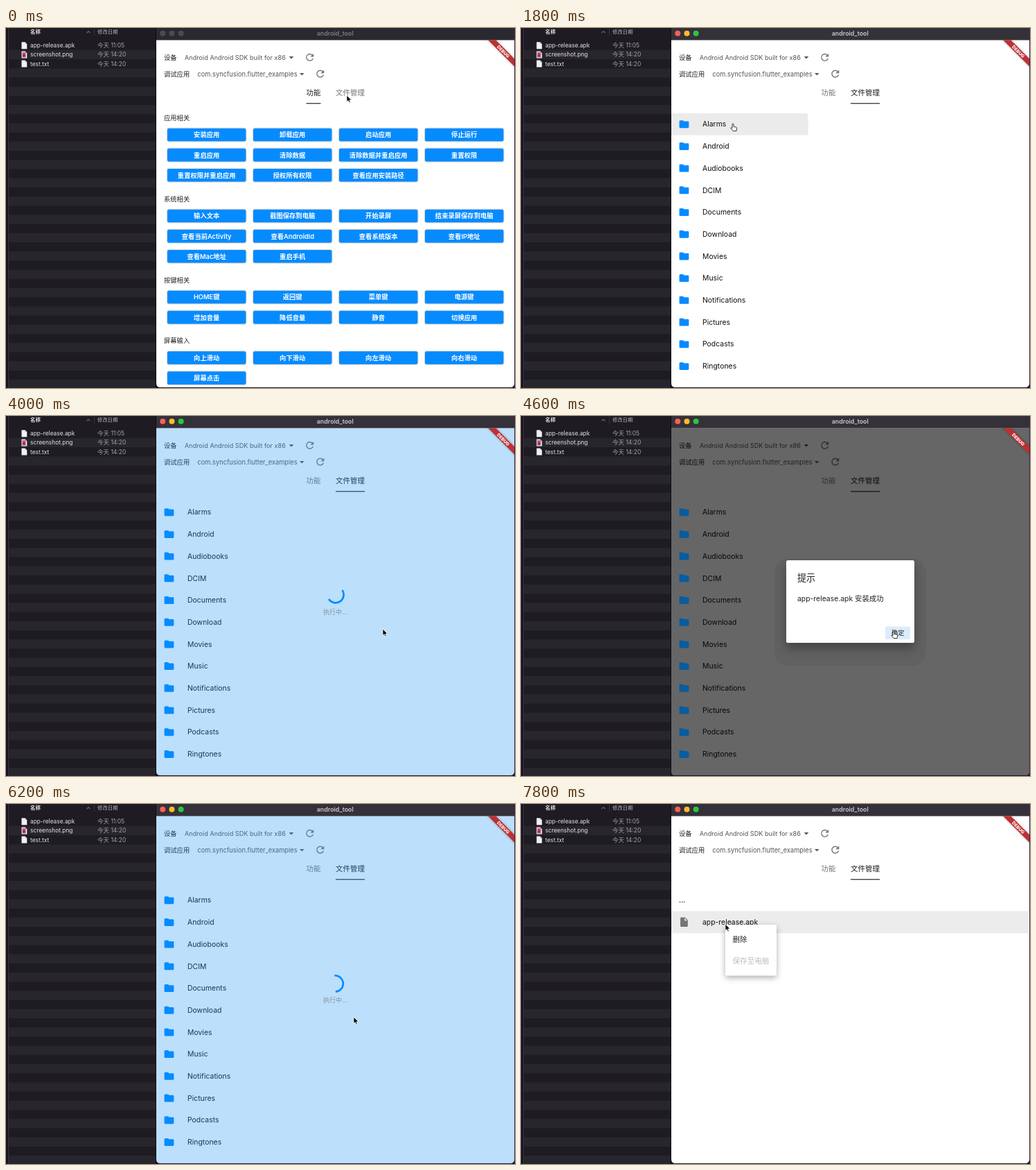
Recreate the animation shown at these times as an HTML page. Size 735 by 519 pixels, loop 8 s.

```html
<!DOCTYPE html>
<html lang="zh-CN">
<head>
<meta charset="utf-8">
<title>android_tool</title>
<style>
html, body { margin: 0; width: 100%; height: 100%; overflow: hidden; background: #17131f; }
svg { display: block; width: 735px; height: 519px; }
text { font-family: Inter, "Noto Sans CJK SC", "Noto Sans CJK JP", sans-serif; white-space: pre; }
.raised { filter: drop-shadow(0 .8px .8px rgba(0,0,0,.38)); }
.dialog { filter: drop-shadow(0 8px 7px rgba(0,0,0,.3)); }
.menu { filter: drop-shadow(0 3px 4px rgba(0,0,0,.32)); }
</style>
</head>
<body>
<svg id="stage" viewBox="0 0 735 519" xmlns="http://www.w3.org/2000/svg">
  <defs>
    <clipPath id="body"><path d="M217 17.5H734V512Q734 518 728 518H223Q217 518 217 512Z"/></clipPath>
    <clipPath id="row"><rect x="217" y="123" width="517" height="31.5"/></clipPath>
    <linearGradient id="edge">
      <stop offset="0" stop-opacity=".24"/><stop offset=".4" stop-opacity=".1"/><stop offset="1" stop-opacity=".035"/>
    </linearGradient>
  </defs>
  <g id="finder"></g>
  <g id="app"></g>
</svg>
<script>
const LOOP = 8000, STEP = 200, BLUE = '#068bff';
const FOLDER = 'M10 4H4c-1.1 0-2 .9-2 2v12c0 1.1.9 2 2 2h16c1.1 0 2-.9 2-2V8c0-1.1-.9-2-2-2h-8z';
const FILE = 'M6 2c-1.1 0-2 .9-2 2v16c0 1.1.9 2 2 2h12c1.1 0 2-.9 2-2V8l-6-6zm7 7V3.5L18.5 9z';
const REFRESH = 'M17.65 6.35A8 8 0 1 0 19.73 14h-2.08A6 6 0 1 1 16.22 7.78L13 11h7V4z';
const ARROW = 'M0 0V9.6L2.2 7.6 3.7 11 5.3 10.3 3.9 7H6.9Z';
const HAND = 'M-1 .8C-1-.4 1-.4 1 .8V4.2L4.6 5C5.6 5.3 5.8 6 5.6 7L5 10.5H.2L-3 6.8C-3.6 5.8-2.4 5.2-1.7 5.9L-1 6.6Z';

const FOLDERS = ['Alarms', 'Android', 'Audiobooks', 'DCIM', 'Documents', 'Download',
  'Movies', 'Music', 'Notifications', 'Pictures', 'Podcasts', 'Ringtones'];
const SECTIONS = [
  [129.5, '应用相关', '安装应用 卸载应用 启动应用 停止运行 重启应用 清除数据 清除数据并重启应用 重置权限 重置权限并重启应用 授权所有权限 查看应用安装路径'],
  [246.5, '系统相关', '输入文本 截图保存到电脑 开始录屏 结束录屏保存到电脑 查看当前Activity 查看AndroidId 查看系统版本 查看IP地址 查看Mac地址 重启手机'],
  [363.5, '按键相关', 'HOME键 返回键 菜单键 电源键 增加音量 降低音量 静音 切换应用'],
  [451, '屏幕输入', '向上滑动 向下滑动 向左滑动 向右滑动 屏幕点击']
];
const ASK = { y: 214, h: 107, msg: '是否安装app-release.apk?', cancel: true };
const done = msg => ({ y: 208, h: 119, msg: 'app-release.apk ' + msg });
const DIALOGS = [
  [3400, 3800, ASK], [4400, 5000, done('安装成功')],
  [5500, 6200, ASK], [6400, 7000, done('传输成功')]
];

// pointer path: time, x, y
const PATH = [[0, 492, 97], [800, 492, 97], [1400, 306, 138], [2200, 306, 138], [2600, 67, 25],
  [3000, 308, 99], [3200, 322, 160], [3300, 322, 160], [3600, 544, 307], [4300, 544, 307],
  [4600, 538, 310], [4800, 538, 310], [5100, 67, 25], [5400, 320, 309], [5600, 320, 309],
  [6000, 502, 307], [6200, 502, 307], [6400, 538, 310], [6800, 538, 310], [7200, 306, 138],
  [7400, 306, 138], [7600, 295, 173], [8000, 295, 173]];
// half-open time spans
const BACK = [[0, 200], [2600, 3600], [5100, 6000]];
const DRAG = [[2700, 3300], [5150, 5500]];
const POINTING = [[200, 800], [1400, 2400], [3600, 3800], [4600, 5000], [6000, 6200], [6400, 7000], [7200, 7600]];
const LOADING = [[3800, 4400], [6200, 6400]];
const INSIDE = [[2000, 2400], [7400, 8000]];

const clamp = v => Math.max(0, Math.min(1, v));
const lerp = (a, b, p) => a + (b - a) * p;
const ease = p => p * p * (3 - 2 * p);
const within = (t, spans) => spans.some(([a, b]) => t >= a && t < b);

const rect = (x, y, w, h, fill, more = '') =>
  `<rect x="${x}" y="${y}" width="${w}" height="${h}" fill="${fill}" ${more}/>`;
const text = (x, y, s, size, fill, more = '') =>
  `<text x="${x}" y="${y + size * .36}" font-size="${size}" fill="${fill}" ${more}>${s}</text>`;
const path = (d, fill, more = '') => `<path d="${d}" fill="${fill}" ${more}/>`;
const icon = (d, x, y, scale, fill) =>
  path(d, fill, `transform="translate(${x} ${y}) scale(${scale}) translate(-12 -12)"`);
const group = (s, more) => `<g ${more}>${s}</g>`;
const MID = 'text-anchor="middle"', BOLD = 'font-weight="600"', MEDIUM = 'font-weight="500"';

function finder() {
  let s = rect(0, 0, 735, 519, '#1a1328') + rect(3.5, 0, 213, 519, '#1e1c22');
  for (let i = 1; i < 38; i += 2) s += rect(4, 18.6 + 13.2 * i, 212, 13.2, '#28262d');
  s += rect(3, 0, 1, 519, '#37343c') + rect(216, 0, 1, 519, '#0e0c12') + rect(127, 1, .7, 10, '#403e45');
  s += text(35, 5.5, '名称', 7.4, '#e4e2e6', BOLD) + text(132, 5.5, '修改日期', 7.4, '#b5b3b8');
  s += path('M116.5 7.2 119 4.6 121.5 7.2', 'none', 'stroke="#a5a3a9" stroke-width=".9"');
  [['app-release.apk', '11:05'], ['screenshot.png', '14:20'], ['test.txt', '14:20']].forEach(([name, time], i) => {
    const y = 25.3 + 13.1 * i;
    s += path(`M22.5 ${y - 5}h5l2.8 2.8v7.2h-7.8z`, '#f1f0f2') + path(`M27.5 ${y - 5}v2.8h2.8z`, '#bbb9be');
    if (i === 1) s += rect(23.5, y - 3.5, 5.2, 7.5, '#cf5b79') + rect(24.5, y - .5, 3, 3.5, '#7b3158');
    s += text(35, y, name, 8.35, '#e6e4e8') + text(132, y, '今天 ' + time, 8.5, '#a4a2a8');
  });
  return s;
}

function titleBar(active) {
  const lights = active ? ['#ff5f57', '#febc2e', '#28c840'] : ['#4c4a51', '#4c4a51', '#4c4a51'];
  return rect(217, 0, 517, 18, active ? '#353139' : '#2b2930') +
    lights.map((c, i) => `<circle cx="${226.3 + 13.2 * i}" cy="7.8" r="4" fill="${c}"/>`).join('') +
    text(475.3, 7.6, 'android_tool', 8.9, active ? '#c9c7cc' : '#7d7b82', MID + ' ' + BOLD);
}

function header(tab) {
  const caret = (x, y) => path(`M${x - 3.3} ${y - 1.6}h6.6l-3.3 3.3z`, '#555');
  const shade = p => { const v = Math.round(lerp(117, 30, p)); return `rgb(${v},${v},${v})`; };
  return text(228, 42.7, '设备', 9.3, '#222', MEDIUM) +
    text(258, 43, 'Android Android SDK built for x86', 9.15, '#555') + caret(412, 42.7) +
    icon(REFRESH, 438.7, 42.3, .69, '#757575') +
    text(228, 66.3, '调试应用', 9.3, '#222', MEDIUM) +
    text(276.5, 66.7, 'com.syncfusion.flutter_examples', 9.25, '#555') + caret(427.3, 66.5) +
    icon(REFRESH, 453.8, 66, .69, '#757575') +
    text(433.5, 93.3, '功能', 10.5, shade(1 - tab), MEDIUM) +
    text(476, 93.3, '文件管理', 10.5, shade(tab), MEDIUM) +
    rect(lerp(433.5, 476, tab), 108, lerp(21, 42, tab), 1.4, '#444');
}

function features() {
  return SECTIONS.map(([y, name, labels]) => text(228, y, name, 9.3, '#222') +
    labels.split(' ').map((label, i) => {
      const x = 233 + 124 * (i % 4), cy = y + 24.6 + 29.1 * (i >> 2);
      return rect(x, cy - 9.4, 113.4, 18.6, BLUE, 'rx="2" class="raised"') +
        text(x + 56.7, cy, label, 9.3, '#fff', MID + ' ' + BOLD);
    }).join('')).join('');
}

const rowY = i => 138.7 + 31.7 * i;

function folderNames(t) {
  const start = t < 4000 ? 1600 : 7000, age = t - start;
  let s = '';
  if (age > 0 && age < 400)
    s += `<circle cx="308" cy="140" r="${107 * age / 200}" fill="#ebebeb" clip-path="url(#row)"/>`;
  return s + FOLDERS.map((name, i) => text(262, rowY(i), name, 10.45, '#111')).join('');
}

function folderView(t) {
  let s = text(228, 138.5, '...', 10.5, '#111', MEDIUM);
  if (t < 7000) return s;
  if (t >= 7600) s += rect(217, 154.5, 516, 31.7, '#ececec');
  s += icon(FILE, 235.5, 170.3, .67, '#757575') + text(262, 170.4, 'app-release.apk', 10.4, '#111');
  if (t >= 7800)
    s += rect(295, 174, 74, 73.5, '#fff', 'rx="2" class="menu"') +
      text(305.5, 195, '删除', 10.5, '#222') + text(305.5, 226.5, '保存至电脑', 10.6, '#bdbdbd');
  return s;
}

function dialog({ y, h, msg, cancel }, alpha, hover) {
  const by = y + h - 14.3;
  let s = rect(366, y - 2, 219, h + 35, '#000', 'rx="20" opacity=".05"') +
    rect(383, y, 185, h, '#fff', 'rx="2.6" class="dialog"') +
    text(399, y + 25.3, '提示', 13.1, '#222', MEDIUM) +
    text(399, y + 55.4, msg, 10.4, '#222');
  if (cancel) s += text(493, by, '取消', 9.3, '#777');
  else if (hover) s += rect(526, by - 9.2, 36, 18.4, '#dcecfb', 'rx="2.5"');
  return group(s + text(535, by, '确定', 9.3, '#222', MEDIUM), `opacity="${alpha}"`);
}

function loader(t) {
  const turn = (t - 4000) * .3;
  return path('M485.6 251.1A11.7 11.7 0 1 1 466.1 264.1', 'none',
    `stroke="${BLUE}" stroke-width="2.7" transform="rotate(${turn} 476.7 258.9)"`) +
    text(475.5, 282.5, '执行中...', 9.1, '#8192a0', MID);
}

const ribbon = group(
  rect(-40, 18.5, 80, 7.9, '#000', 'opacity=".35" style="filter:blur(1.6px)"') +
  rect(-40, 18.5, 80, 7.9, '#bd3033') +
  text(0, 22.5, 'DEBUG', 6.5, '#fff', MID + ' font-weight="800"'),
  'transform="translate(734 18) rotate(45)"');

function pointer(t) {
  const i = PATH.findIndex(k => k[0] > t), [ta, xa, ya] = PATH[i - 1], [tb, xb, yb] = PATH[i];
  const p = (t - ta) / (tb - ta), x = lerp(xa, xb, p), y = lerp(ya, yb, p);
  let s = '';
  if (within(t, DRAG))
    s += rect(-62, -11, 20, 27, '#eee', 'opacity=".6"') +
      path('M-55-5h5l3 3v8h-8z', '#fff', 'stroke="#ddd" stroke-width=".6"') +
      rect(-44, -5, 73, 11, '#1c60cc', 'rx="4.5"') + text(-41.5, .4, 'app-release.apk', 8.35, '#fff') +
      '<circle cx="6.3" cy="15" r="6.3" fill="#24a62f" stroke="#fff" stroke-width=".6"/>' +
      path('M2.9 15h6.8M6.3 11.6v6.8', 'none', 'stroke="#fff" stroke-width="1.7"');
  s += within(t, POINTING)
    ? path(HAND, '#fff', 'stroke="#222" stroke-width=".9"')
    : path(ARROW, '#000', 'stroke="#fff" stroke-width=".8"');
  return group(s, `transform="translate(${x} ${y})"`);
}

function draw(t) {
  const tab = ease(clamp((t - 200) / 300)), inside = within(t, INSIDE), back = within(t, BACK);
  const open = DIALOGS.find(([a, b]) => t >= a && t < b);
  const alpha = open ? clamp(Math.min((t - open[0] + 100) / 200, (open[1] - t) / 350)) : 0;
  const slide = x => `transform="translate(${x} 0)"`;

  let s = rect(217, 17, 517, 501, '#fff') + header(tab);
  if (tab < 1) s += group(features(), slide(-517 * tab));
  if (tab > 0) s += group(inside ? folderView(t) : folderNames(t), slide(517 * (1 - tab)));
  if (back && t > 200) s += rect(217, 17, 29, 502, 'url(#edge)');
  if (within(t, LOADING)) s += rect(217, 17, 517, 502, '#2196f3', 'opacity=".3"') + loader(t);
  if (open) s += rect(217, 17, 517, 502, '#000', `opacity="${.6 * Math.sqrt(alpha)}"`);
  // folder icons keep more colour than the dimmed page
  if (tab > 0 && !inside)
    s += group(FOLDERS.map((_, i) => icon(FOLDER, 235.5, rowY(i), .69, open ? '#085c9f' : BLUE)).join(''),
      slide(517 * (1 - tab)));
  if (open) s += dialog(open[2], alpha, within(t, POINTING));
  return titleBar(!back) + group(s + ribbon, 'clip-path="url(#body)"') +
    rect(734, 0, 1, 519, '#35265c') + pointer(t);
}

const app = document.getElementById('app');
document.getElementById('finder').innerHTML = finder();
let shown = -1;
function tick(now) {
  const t = Math.floor(now % LOOP / STEP) * STEP;
  if (t !== shown) app.innerHTML = draw(shown = t);
  requestAnimationFrame(tick);
}
tick(performance.now());
</script>
</body>
</html>
```
